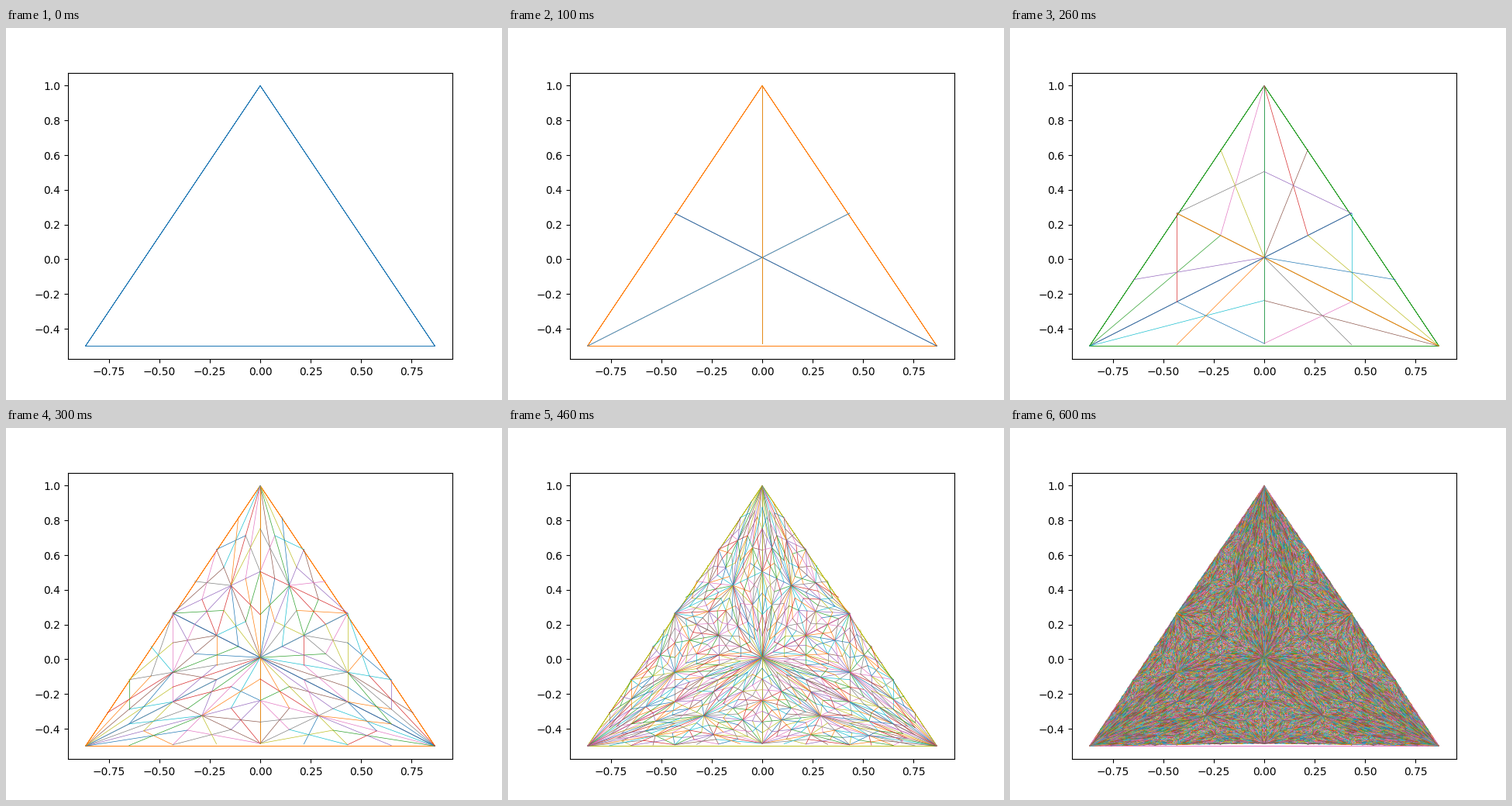
A matplotlib script that plays this animation: 640 px wide and 480 px high, repeating every 0.7 s.

```python
import math
from itertools import cycle, islice

import matplotlib.pyplot as plt
import numpy as np
from matplotlib.animation import FuncAnimation
from matplotlib.collections import LineCollection

FRAMES = 7
LINE_WIDTH = 0.5
PALETTE = cycle(f"C{i}" for i in range(10))

# Points are complex numbers: x + iy
TOP = 1j
LEFT = complex(-math.sqrt(3) / 2, -0.5)
RIGHT = complex(math.sqrt(3) / 2, -0.5)
CORNERS = (TOP, LEFT, RIGHT)
CENTER = 0.01j


def medians(tri, g):
    """Segments from each corner through g to the opposite side."""
    return [(v, 1.5 * g - 0.5 * v) for v in tri]


def children(tri, g):
    a, b, c = tri
    ma, mb, mc = (end for _, end in medians(tri, g))
    return [(a, mb, g), (a, mc, g), (b, ma, g),
            (b, mc, g), (c, ma, g), (c, mb, g)]


def subdivide(tri, depth):
    if depth == 0:
        return
    g = sum(tri) / 3
    yield from medians(tri, g)
    for child in children(tri, g):
        yield from subdivide(child, depth - 1)


def segments(depth):
    if depth == 0:
        return []
    # The main medians are overdrawn in turn, so their colours blend
    segs = list(islice(cycle(medians(CORNERS, CENTER)), 10))
    for child in children(CORNERS, CENTER):
        segs.extend(subdivide(child, depth - 1))
    return segs


def build(ax, depth):
    # Several passes in one path sharpen the thin outline
    outline = np.array(CORNERS * 3 + (TOP,))
    line, = ax.plot(outline.real, outline.imag, color=next(PALETTE),
                    lw=LINE_WIDTH)
    segs = segments(depth)
    if not segs:
        return [line]
    z = np.array(segs)
    mesh = LineCollection(np.stack([z.real, z.imag], axis=-1),
                          colors=list(islice(PALETTE, len(segs))),
                          linewidths=LINE_WIDTH, capstyle="projecting",
                          zorder=2)
    ax.add_collection(mesh)
    return [line, mesh]


fig, ax = plt.subplots(figsize=(6.4, 4.8), dpi=100)
stages = [build(ax, depth) for depth in range(FRAMES)]


def update(frame):
    for i, stage in enumerate(stages):
        for artist in stage:
            artist.set_visible(i == frame)
    return [artist for stage in stages for artist in stage]


anim = FuncAnimation(fig, update, frames=FRAMES, interval=100,
                     init_func=lambda: update(0), repeat=True)
plt.show()
```
